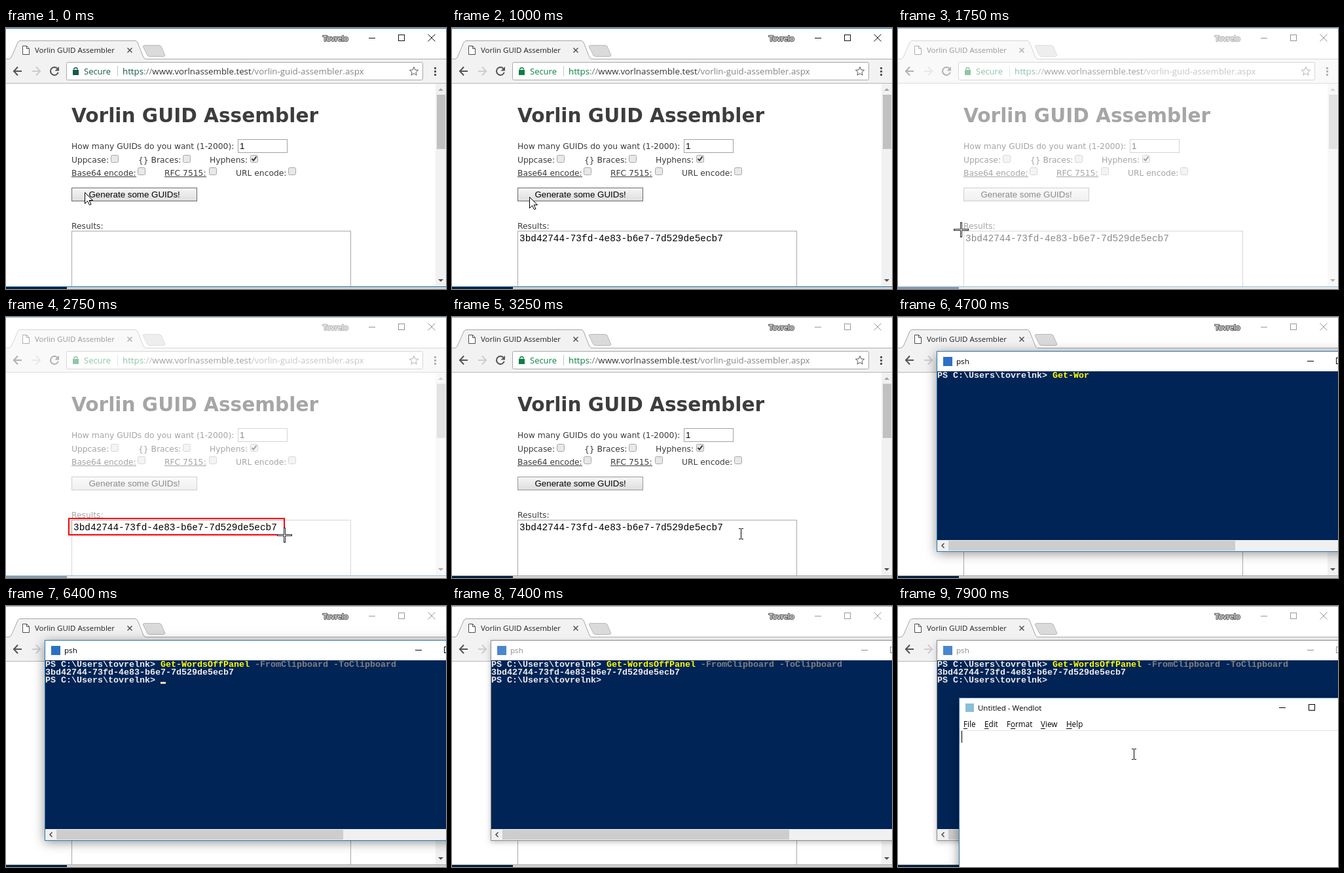
Animation, 672 px wide and 399 px high, one loop 8 s. Source, as an HTML page with a canvas:

```html
<!DOCTYPE html>
<html lang="en">
<head>
<meta charset="utf-8">
<title>Capture demo</title>
<style>
  html, body { margin: 0; width: 100%; height: 100%; overflow: hidden; background: #fff; }
  canvas { display: block; }
</style>
</head>
<body>
<canvas id="stage" width="672" height="399"></canvas>
<script>
const W = 672, H = 399, LOOP = 8000;
const ctx = document.getElementById('stage').getContext('2d');

const UI = '"Open Sans", "Noto Sans", sans-serif';
const PAGE = '"DejaVu Sans", sans-serif';
const MONO = '"Liberation Mono", monospace';
const ARIAL = '"Liberation Sans", sans-serif';

const TITLE = 'Vorlin GUID Assembler';
const GUID = '3bd42744-73fd-4e83-b6e7-7d529de5ecb7';
const PROMPT = 'PS C:\\Users\\tovrelnk>';
const CMD = 'Get-WordsOffPanel';
const ARGS = ' -FromClipboard -ToClipboard';

// Each entry is [start time, value]; the latest one reached applies.
const typed = [
  [3500, 0], [3650, 1], [3800, 2], [3950, 3], [4250, 4], [4400, 5], [4550, 6],
  [4700, 7], [4850, 8], [5000, 17], [5150, 19], [5300, 20], [5450, 32],
  [5600, 34], [5750, 35], [5900, 45]
];
const arrowPath = [[0, [120, 251]], [1000, [118, 258]], [1250, [108, 280]], [1500, [97, 304]]];
const dragEnd = [[1750, null], [2000, [190, 316]], [2250, [310, 325]], [2500, [405, 331]], [2750, [425, 333]]];

function at(list, t) {
  let value = list[0][1];
  for (const [start, v] of list) if (t >= start) value = v;
  return value;
}

function rect(x, y, w, h, color) {
  ctx.fillStyle = color;
  ctx.fillRect(x, y, w, h);
}

function frame(x, y, w, h, color) {
  ctx.strokeStyle = color;
  ctx.lineWidth = 1;
  ctx.strokeRect(x + .5, y + .5, w - 1, h - 1);
}

function box(x, y, w, h, fill, edge) {
  rect(x, y, w, h, fill);
  frame(x, y, w, h, edge);
}

function text(s, x, y, size, family, color, weight = '') {
  ctx.font = `${weight} ${size}px ${family}`;
  ctx.fillStyle = color;
  ctx.fillText(s, x, y);
  return x + ctx.measureText(s).width;
}

function trace(points, closed) {
  ctx.beginPath();
  points.forEach(([x, y], i) => i ? ctx.lineTo(x, y) : ctx.moveTo(x, y));
  if (closed) ctx.closePath();
}

function line(points, color, width = 1) {
  trace(points);
  ctx.strokeStyle = color;
  ctx.lineWidth = width;
  ctx.stroke();
}

function shape(points, fill, edge) {
  trace(points, true);
  ctx.fillStyle = fill;
  ctx.fill();
  if (edge) {
    ctx.strokeStyle = edge;
    ctx.lineWidth = 1;
    ctx.stroke();
  }
}

function cross(x, y, size, color, width) {
  line([[x, y], [x + size, y + size]], color, width);
  line([[x + size, y], [x, y + size]], color, width);
}

function shadowed(blur, alpha, x, y, w, h) {
  ctx.save();
  ctx.shadowColor = `rgba(0,0,0,${alpha})`;
  ctx.shadowBlur = blur;
  ctx.shadowOffsetY = 3;
  rect(x, y, w, h, '#fff');
  ctx.restore();
}

function userName() {
  ctx.save();
  ctx.font = `11.5px ${UI}`;
  ctx.lineJoin = 'round';
  ctx.lineWidth = 2.5;
  ctx.strokeStyle = '#666';
  ctx.strokeText('Tovrelo', 484, 20);
  ctx.restore();
  text('Tovrelo', 484, 20, 11.5, UI, '#fff');
}

function tabStrip(edge, ink) {
  rect(0, 0, W, 48, '#fff');
  rect(0, 0, W, 1, edge);
  rect(0, 47, W, 1, '#ababab');
  rect(0, 48, W, 36, '#f2f2f2');
  rect(0, 84, W, 1, '#b6b6b6');

  const tab = [[5, 47.5], [8, 45], [18, 22], [21, 19.5], [198, 19.5], [201, 22], [210, 45], [213, 47.5]];
  shape([...tab, [213, 48], [5, 48]], '#f2f2f2');
  line(tab, '#a5a5a5');
  shape([[211, 26.5], [234, 26.5], [237, 28], [243, 42], [241, 43.5], [219, 43.5], [216, 42], [209, 28]], '#dadada', '#b8b8b8');

  shape([[25.5, 27.5], [31.5, 27.5], [35.5, 31.5], [35.5, 40.5], [25.5, 40.5]], '#fff', '#4c4c4c');
  line([[31.5, 27.5], [31.5, 31.5], [35.5, 31.5]], '#4c4c4c');
  text(TITLE, 44, 38, 11.5, UI, '#222');
  cross(185.5, 30.5, 7, '#505050', 1.5);

  userName();
  rect(554, 15, 10, 1, ink);
  frame(599, 10, 10, 10, ink);
  cross(644.5, 9.5, 11, ink, 1);
}

function toolbar(secure) {
  const arrow = (x, dir, color) => {
    line([[x, 66], [x + 13 * dir, 66]], color, 2);
    line([[x + 7 * dir, 59.5], [x + dir, 66], [x + 7 * dir, 72.5]], color, 2);
  };
  arrow(11, 1, '#555');
  arrow(53, -1, '#cdcdcd');

  ctx.beginPath();
  ctx.arc(74, 66, 6, .3, 5.5);
  ctx.strokeStyle = '#555';
  ctx.lineWidth = 2;
  ctx.stroke();
  shape([[81, 59], [81, 65.5], [74.5, 65.5]], '#555');

  ctx.beginPath();
  ctx.roundRect(92.5, 52.5, 544, 27, 2);
  ctx.fillStyle = '#fff';
  ctx.fill();
  ctx.strokeStyle = '#a8a8a8';
  ctx.lineWidth = 1;
  ctx.stroke();

  rect(102, 64, 9, 8, secure);
  ctx.beginPath();
  ctx.arc(106.5, 63.5, 2.8, Math.PI, 0);
  ctx.strokeStyle = secure;
  ctx.lineWidth = 1.5;
  ctx.stroke();
  text('Secure', 119, 71, 13, UI, secure);
  rect(170, 58, 1, 16, '#c4c4c4');
  let x = text('https', 178, 71, 13.3, UI, secure);
  x = text('://', x, 71, 13.3, UI, '#777');
  x = text('www.vorlnassemble.test', x, 71, 13.3, UI, '#333');
  text('/vorlin-guid-assembler.aspx', x, 71, 13.3, UI, '#858585');

  const star = [];
  for (let i = 0; i < 10; i++) {
    const a = i * Math.PI / 5 - Math.PI / 2, r = i % 2 ? 3.1 : 7;
    star.push([623 + r * Math.cos(a), 66.5 + r * Math.sin(a)]);
  }
  shape(star, '#fff', '#5a5a5a');
  for (const y of [60, 65, 70]) rect(654, y, 3, 3, '#555');
}

function checkbox(x, y, checked) {
  ctx.beginPath();
  ctx.roundRect(x + .5, y + .5, 11, 11, 2);
  ctx.fillStyle = '#e8e8e8';
  ctx.fill();
  ctx.strokeStyle = '#a8a8a8';
  ctx.lineWidth = 1;
  ctx.stroke();
  if (checked) line([[x + 2.5, y + 6], [x + 5, y + 8.5], [x + 9.5, y + 2.5]], '#333', 2);
}

function label(s, x, y, underlined) {
  const end = text(s, x, y, 12.3, PAGE, '#3c3c3c');
  if (underlined) rect(x, y + 1, Math.round(end - x), 1, '#3c3c3c');
}

function page(t) {
  rect(0, 85, W, 310, '#fff');
  text(TITLE, 100, 144, 29.6, PAGE, '#3d3d3d', 'bold');

  label('How many GUIDs do you want (1-2000):', 100, 185);
  box(354, 170, 76, 21, '#fff', '#a2a2a2');
  text('1', 357, 185, 13.33, ARIAL, '#000');

  label('Uppcase:', 100, 206);
  checkbox(160, 194);
  label('{} Braces:', 202, 206);
  checkbox(270, 194);
  label('Hyphens:', 311, 206);
  checkbox(373, 194, true);
  label('Base64 encode:', 100, 226, true);
  checkbox(201, 213);
  label('RFC 7515:', 242, 226, true);
  checkbox(310, 213);
  label('URL encode:', 351, 226);
  checkbox(431, 213);

  const pressed = t >= 500 && t < 750, hovered = t < 1250;
  const shade = ctx.createLinearGradient(0, 244, 0, 265);
  shade.addColorStop(0, pressed ? '#dedede' : '#f6f6f6');
  shade.addColorStop(1, pressed ? '#f0f0f0' : '#dddddd');
  box(100, 244, 192, 21, shade, hovered ? '#6a6a6a' : '#989898');
  text('Generate some GUIDs!', 126.5, 259, 13.33, ARIAL, '#000');

  label('Results:', 100, 307);
  box(100, 310, 427, 100, '#fff', '#a9a9a9');
  if (t >= 750) text(GUID, 103, 326, 14.4, MONO, '#000');

  rect(656, 85, 16, 310, '#f1f1f1');
  rect(658, 102, 13, 83, '#c1c1c1');
  shape([[660, 96], [668, 96], [664, 92]], '#a3a3a3');
  shape([[660, 384], [668, 384], [664, 388]], '#505050');
}

function taskbar(edge) {
  rect(0, 395, W, 1, edge);
  rect(0, 396, W, 3, '#d2d2d2');
  rect(0, 396, 93, 3, '#00203f');
}

function arrowCursor(x, y) {
  const p = [[0, 0], [0, 17], [4, 13], [7, 19], [9.5, 18], [6.5, 12], [12, 12]];
  shape(p.map(([a, b]) => [x + a + .5, y + b + .5]), '#fff', '#000');
}

function beam(x, y) {
  rect(x, y - 7, 1, 15, '#000');
  for (const dy of [-8, 8]) {
    rect(x - 3, y + dy, 3, 1, '#000');
    rect(x + 1, y + dy, 3, 1, '#000');
  }
}

function crosshair(x, y) {
  rect(x - 11, y - 1, 23, 3, '#222');
  rect(x - 1, y - 11, 3, 23, '#222');
  rect(x - 10, y, 21, 1, '#fff');
  rect(x, y - 10, 1, 21, '#fff');
}

function snip(t) {
  const end = at(dragEnd, t), [sx, sy] = [96, 308];
  ctx.beginPath();
  ctx.rect(0, 0, W, H);
  if (end) ctx.rect(sx, sy, end[0] - sx, end[1] - sy);
  ctx.fillStyle = 'rgba(255,255,255,.54)';
  ctx.fill('evenodd');
  if (end) {
    ctx.strokeStyle = '#f00';
    ctx.lineWidth = 2;
    ctx.strokeRect(sx, sy, end[0] - sx, end[1] - sy);
  }
  crosshair(...(end || [sx, sy]));
}

function shell(t) {
  const active = t < 7400, ink = active ? '#000' : '#8c8c8c';
  const put = (s, col, row, color) => text(s, 60 + col * 8, 93 + row * 12, 13.33, MONO, color, 'bold');
  const caret = (col, row) => rect(60 + col * 8, 92 + row * 12, 8, 3, '#fedba9');

  shadowed(active ? 16 : 8, active ? .45 : .25, 59, 52, 640, 306);
  box(59, 52, 640, 307, '#fff', active ? '#2a78b0' : '#8c8c8c');
  rect(69, 61, 14, 14, active ? '#2c70c4' : '#4a86d0');
  text('psh', 89, 72, 11.6, UI, ink);
  rect(625, 67, 10, 1, ink);
  frame(669, 62, 10, 10, ink);

  rect(60, 83, W, 258, '#012456');
  rect(60, 341, W, 17, '#f0f0f0');
  rect(77, 342, 438, 15, '#cdcdcd');
  line([[70.5, 346], [67, 349.5], [70.5, 353]], '#444', 1.5);

  const n = at(typed, t);
  put(PROMPT, 0, 0, '#eeedf0');
  put(CMD.slice(0, n), 22, 0, '#ff0');
  put(ARGS.slice(0, Math.max(0, n - CMD.length)), 39, 0, '#808080');
  if (n === 19 || (n === 45 && t < 6400)) caret(22 + n, 0);
  if (t >= 6400) {
    put(GUID, 0, 1, '#eeedf0');
    put(PROMPT, 0, 2, '#eeedf0');
    if (active) caret(22, 2);
  }
}

function editor(t) {
  shadowed(16, .45, 93, 141, 640, 300);
  box(93, 140, 640, 300, '#fff', '#2a78b0');
  rect(103, 149, 13, 13, '#8ac0d8');
  text('Untitled - Wendlot', 122, 160, 11.5, UI, '#000');
  rect(582, 155, 10, 1, '#000');
  frame(627, 150, 10, 10, '#000');

  const menu = [['File', 100, 0], ['Edit', 132, 0], ['Format', 166, 1], ['View', 218, 0], ['Help', 257, 0]];
  for (const [name, x, key] of menu) {
    text(name, x, 185, 11.7, UI, '#000');
    const left = ctx.measureText(name.slice(0, key)).width;
    rect(x + left, 187, ctx.measureText(name[key]).width, 1, '#000');
  }
  rect(94, 190, W, 1, '#e6e6e6');
  if (t >= 7900) rect(97, 191, 1, 18, '#000');
  beam(360, 226);
}

function draw(t) {
  const active = t < 3000;
  const edge = active ? '#1c6ca8' : '#a6a6a6';
  tabStrip(edge, active ? '#111' : '#999');
  toolbar(t < 750 ? '#14594a' : '#0b8043');
  page(t);
  taskbar(edge);

  if (t < 1750) arrowCursor(...at(arrowPath, t));
  else if (t < 3000) snip(t);
  else if (t < 3250) beam(430, 331);
  else if (t < 3500) beam(441, 331);
  else shell(t);

  if (t >= 7650) editor(t);
}

const begun = performance.now();
function tick() {
  draw((performance.now() - begun) % LOOP);
  requestAnimationFrame(tick);
}
tick();
</script>
</body>
</html>
```
